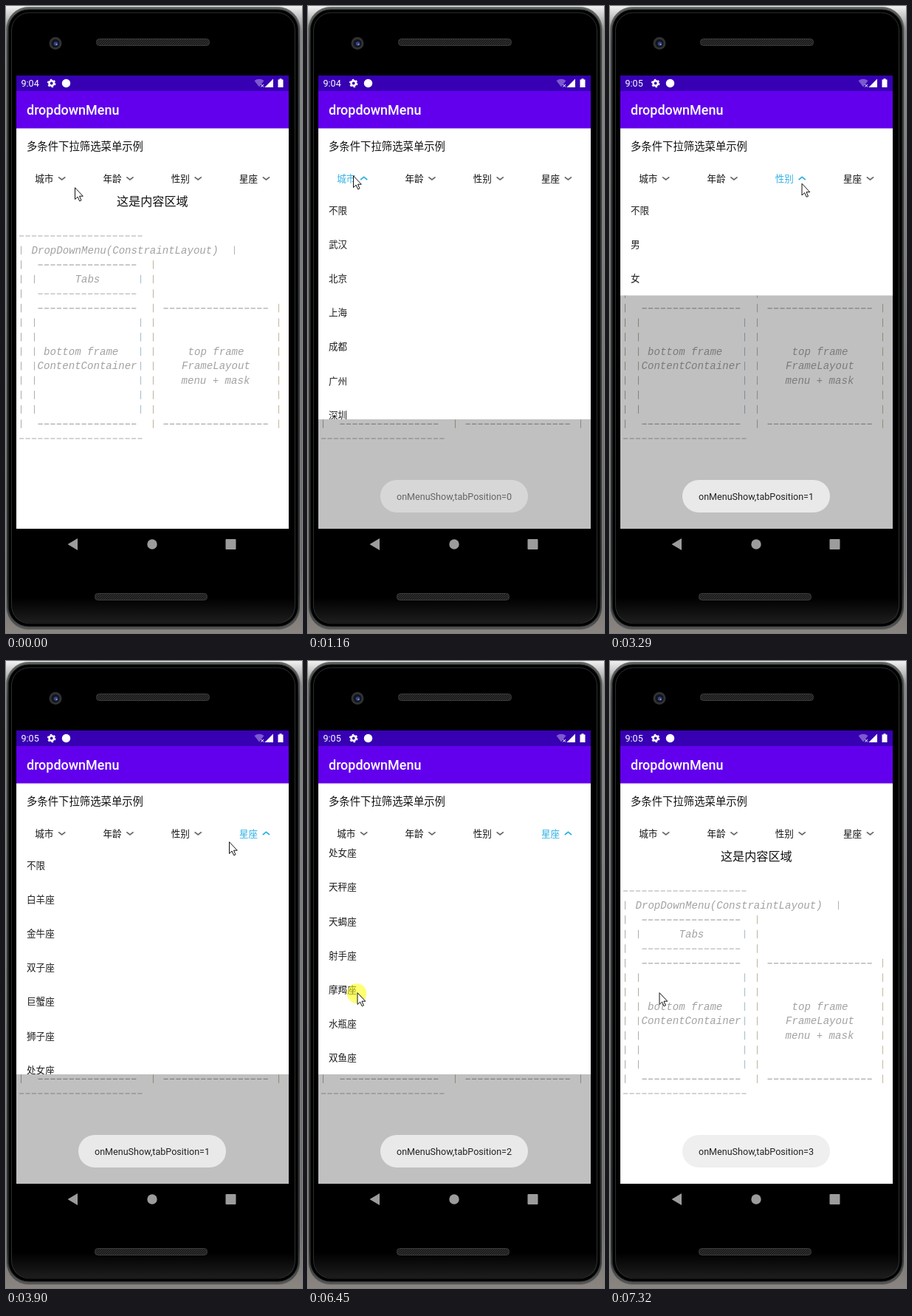
An HTML page that plays this animation: 401x848 px, repeating every 8000 ms.

```html
<!DOCTYPE html>
<html lang="zh-CN">
<head>
<meta charset="utf-8">
<title>dropdownMenu</title>
<style>
html, body { margin: 0; width: 100%; height: 100%; overflow: hidden; background: #777; }
svg { display: block; width: 401px; height: 848px; font-family: Roboto, "Noto Sans CJK SC", "Noto Sans CJK", sans-serif; }
.mono { font: italic 14.07px "Liberation Mono", monospace; fill: #a2a2a2; }
.item { font-size: 12.57px; fill: #1c1c1c; }
</style>
</head>
<body>
<svg viewBox="0 0 401 848" xmlns="http://www.w3.org/2000/svg">
  <defs>
    <linearGradient id="back" x2="0" y2="1">
      <stop offset="0" stop-color="#f2f2f2"/><stop offset=".04" stop-color="#8a8a8a"/>
      <stop offset=".9" stop-color="#6c6c6c"/><stop offset="1" stop-color="#8b8580"/>
    </linearGradient>
    <linearGradient id="rim" x2="0" y2="1">
      <stop offset="0" stop-color="#5c605f"/><stop offset=".06" stop-color="#3a3d3d"/>
      <stop offset=".94" stop-color="#2c2e2e"/><stop offset="1" stop-color="#555"/>
    </linearGradient>
    <linearGradient id="foot" x2="0" y2="1">
      <stop offset="0" stop-color="#000"/><stop offset="1" stop-color="#1d1d1d"/>
    </linearGradient>
    <pattern id="mesh" width="3" height="3" patternUnits="userSpaceOnUse">
      <rect width="3" height="3" fill="#1b1b1b"/><path d="M0 3L3 0" stroke="#3d3d3d" stroke-width=".8"/>
    </pattern>
    <clipPath id="page"><rect x="14" y="253" width="369" height="454"/></clipPath>
    <clipPath id="listClip"><rect id="listBox" x="14" y="253" width="369" height="306"/></clipPath>
  </defs>

  <rect width="401" height="848" fill="url(#back)"/>
  <rect x=".5" y="1.5" width="398" height="842" rx="30" fill="url(#rim)" stroke="#777b7a"/>
  <rect x="3.5" y="5" width="392" height="834" rx="27" fill="#000" stroke="#161717"/>
  <path d="M8 800H392V815Q390 834 368 834H32Q10 834 8 815Z" fill="url(#foot)"/>
  <rect x="7.5" y="9" width="384" height="826" rx="24" fill="none" stroke="#2d2f2f"/>
  <rect x="122.500" y="44.500" width="153" height="9" rx="4" fill="url(#mesh)" stroke="#3b3b3b"/>
  <rect x="120.500" y="794.500" width="152" height="9" rx="4" fill="url(#mesh)" stroke="#3b3b3b"/>
  <circle cx="67" cy="50.500" r="8.500" fill="#303234"/>
  <circle cx="67" cy="50.500" r="5.500" fill="#12151f"/>
  <circle cx="67.500" cy="51" r="2.800" fill="#34447c"/>
  <circle cx="68.500" cy="52" r="1" fill="#93a5dc"/>

  <rect x="14" y="94" width="369" height="613" fill="#fff"/>
  <rect x="14" y="94" width="369" height="21" fill="#3700b3"/>
  <rect x="14" y="115" width="369" height="50.500" fill="#6200ee"/>
  <text id="clock" x="20.500" y="109" font-size="12.57" fill="#fff"></text>
  <g fill="none" stroke="#fff">
    <circle cx="61.700" cy="104.500" r="3.200" stroke-width="2.600"/>
    <circle cx="61.700" cy="104.500" r="5" stroke-width="1.600" stroke-dasharray="2.600 2.636"/>
  </g>
  <circle cx="81.500" cy="104.500" r="5.700" fill="#fff"/>
  <path d="M336.500 101Q343 96.500 349.500 101L343 109.500Z" fill="#fff" opacity=".35"/>
  <path d="M345.500 106l3.600 3.600m0-3.600l-3.600 3.600" stroke="#fff"/>
  <path d="M362 98.500V110H350.500Z" fill="#fff"/>
  <path d="M368.500 99.500h2v-1.300h3v1.300h2V110h-7Z" fill="#fff"/>
  <text x="28" y="147" font-size="17.96" font-weight="500" fill="#fff">dropdownMenu</text>
  <text x="28" y="195.300" font-size="14.37" fill="#111">多条件下拉筛选菜单示例</text>
  <g id="tabs"></g>

  <text x="198.300" y="270" font-size="16.1" text-anchor="middle" fill="#111">这是内容区域</text>
  <g id="chart"></g>
  <g clip-path="url(#page)">
    <rect id="mask" x="14" y="253" width="369" height="454"/>
    <g id="menu">
      <rect id="panel" x="14" y="253" width="369" height="306" fill="#fff"/>
      <g clip-path="url(#listClip)"><g id="lists"></g></g>
    </g>
  </g>
  <g id="toast">
    <rect x="98" y="641" width="200" height="44" rx="22" fill="#eee" opacity=".9"/>
    <g id="message" font-size="12.57" fill="#222"></g>
  </g>

  <g fill="#9c9c9c">
    <path d="M83.500 728L97 720V736Z"/><circle cx="198" cy="728" r="6.700"/>
    <rect x="297.500" y="721" width="14" height="14" rx="1"/>
  </g>
  <g id="cursor">
    <circle id="press" cx="-.5" cy="1.500" r="13.300" fill="#ff0" opacity=".55"/>
    <path d="M.5 .7V16.500L4.100 13.100L6.700 18.800L9 17.800L6.500 12.200H11.300Z" fill="#fff" stroke="#111"/>
  </g>
</svg>
<script>
const LOOP = 8000, ROW = 46.15, TOP = 253;
const $ = id => document.getElementById(id);
const add = (parent, tag, attrs, text = '') => {
  const el = document.createElementNS('http://www.w3.org/2000/svg', tag);
  for (const k in attrs) el.setAttribute(k, attrs[k]);
  el.textContent = text;
  return parent.appendChild(el);
};
const set = (id, k, v) => $(id).setAttribute(k, v);
const ramp = (t, a, b) => Math.min(1, Math.max(0, (t - a) / (b - a)));
const ease = p => (1 - Math.cos(Math.PI * p)) / 2;

// Interpolates rows of [time, ...values]
function track(keys, t, curve = p => p) {
  const i = keys.findIndex(k => k[0] > t);
  if (i === 0) return keys[0].slice(1);
  if (i < 0) return keys[keys.length - 1].slice(1);
  const a = keys[i - 1], b = keys[i], p = curve(ramp(t, a[0], b[0]));
  return a.slice(1).map((v, n) => v + (b[n + 1] - v) * p);
}

const menus = [
  ['城市', '不限 武汉 北京 上海 成都 广州 深圳'],
  ['年龄', '不限 18岁以下 18-22岁 23-26岁 27-35岁 35岁以上'],
  ['性别', '不限 男 女'],
  ['星座', '不限 白羊座 金牛座 双子座 巨蟹座 狮子座 处女座 天秤座 天蝎座 射手座 摩羯座 水瓶座 双鱼座']
].map(([name, words], i) => {
  const items = words.split(' '), x = 39.3 + i * 92.25;
  const label = add($('tabs'), 'text', { x, y: 238, 'font-size': 12.57 }, name);
  const arrow = add($('tabs'), 'path', { fill: 'none', 'stroke-width': 1.7 });
  const list = add($('lists'), 'g', {});
  items.forEach((s, n) => add(list, 'text', { class: 'item', x: 28, y: 280.8 + n * ROW }, s));
  return { x: x + 36.4, label, arrow, list, height: Math.min(306, items.length * ROW) };
});

// Layout diagram
const rowY = r => 311 + r * 19.57;
const dashes = (r, x, n) => add($('chart'), 'path', {
  d: `M${x} ${rowY(r)}h${n * 8.44}`, stroke: '#aaa', 'stroke-width': 1.1, 'stroke-dasharray': '6.2 2.24'
});
const bars = (x, rows, color) => rows.forEach(r =>
  add($('chart'), 'path', { d: `M${x} ${rowY(r) - 6}v11.500`, stroke: color, 'stroke-width': 1.1 }));
const span = (a, b) => Array.from({ length: b - a + 1 }, (_, i) => a + i);
[0, 14].forEach(r => dashes(r, 18, 20));
[2, 4, 5, 13].forEach(r => dashes(r, 43.5, 16));
[5, 13].forEach(r => dashes(r, 213.5, 17));
bars(20.5, span(1, 13), '#b4afaa');
bars(309.5, [1], '#b4b4b4');
bars(38.5, [3, ...span(6, 12)], '#b4afaa');
bars(182.5, [3, ...span(6, 12)], '#a3bfd0');
bars(199.5, span(2, 13), '#c4b5a2');
bars(369.5, span(5, 13), '#c9b8a2');
[[1, 34.5, 'DropDownMenu(ConstraintLayout)'], [3, 93.5, 'Tabs'], [8, 51, 'bottom frame'],
 [9, 42.5, 'ContentContainer'], [8, 246.5, 'top frame'], [9, 238, 'FrameLayout'], [10, 237.5, 'menu + mask']]
  .forEach(([r, x, s]) => add($('chart'), 'text', { class: 'mono', x, y: rowY(r) + 4 }, s));

// Toast text with one stacked digit per tab
const lead = add($('message'), 'text', { x: 120, y: 668 }, 'onMenuShow,tabPosition=');
const digitX = 120 + lead.getComputedTextLength();
const digits = [0, 1, 2, 3].map(n => add($('message'), 'text', { x: digitX, y: 668 }, n));
const toastAt = [930, 2830, 4850, 6890], FADE = 400;

const pointer = [
  [30, 93, 245], [80, 91, 245], [230, 91, 245], [590, 61, 229], [1600, 61, 229], [1820, 140, 241],
  [2350, 140, 241], [2640, 228, 243], [3200, 228, 243], [3460, 318, 233], [3650, 318, 233],
  [3880, 302, 244], [3910, 302, 244], [3980, 230, 291], [4030, 230, 291], [4250, 221, 471],
  [4400, 221, 471], [4500, 218, 441], [4600, 209, 386], [4690, 195, 342], [4800, 193, 340],
  [5100, 193, 340], [5200, 150, 399], [5400, 62, 440], [5540, 33, 446], [5740, 66.5, 448]
];
const presses = [[770, 870], [1830, 1930], [2750, 2850], [3490, 3600], [4250, 4690], [6450, 6910]];
const scrolls = [[4400, 0], [4500, 30], [4600, 85], [4700, 150], [4800, 220], [4900, 268], [5000, 293.5]];
const opens = [870, 1930, 2850, 3600], CLOSE = 6910, SLIDE = 250;

function draw(t) {
  const shown = Math.max(0, opens.filter(o => t >= o).length - 1);
  const active = t >= opens[0] && t < CLOSE ? shown : -1;
  const reveal = ease(ramp(t, opens[0], opens[0] + SLIDE)) * (1 - ease(ramp(t, CLOSE, CLOSE + SLIDE)));
  const h = menus[shown].height;
  menus.forEach((m, i) => {
    const on = i === active, y = on ? 235 : 231.3, tip = on ? -3.6 : 3.6;
    m.label.setAttribute('fill', on ? '#2fb0e4' : '#111');
    m.arrow.setAttribute('stroke', on ? '#2fb0e4' : '#666');
    m.arrow.setAttribute('d', `M${m.x - 4.6} ${y}l4.600 ${tip}l4.600 ${-tip}`);
    m.list.setAttribute('display', i === shown ? 'inline' : 'none');
  });
  menus[3].list.setAttribute('transform', `translate(0 ${-track(scrolls, t)[0]})`);
  set('panel', 'height', h);
  set('listBox', 'height', h);
  set('menu', 'transform', `translate(0 ${-(1 - reveal) * h})`);
  set('menu', 'display', reveal > 0 ? 'inline' : 'none');
  set('mask', 'opacity', .247 * reveal);

  const fades = toastAt.map(a => ramp(t, a, a + FADE));
  set('toast', 'opacity', fades[0]);
  digits.forEach((d, i) => d.setAttribute('opacity', (i ? fades[i] : 1) * (1 - (fades[i + 1] || 0))));

  const [x, y] = track(pointer, t);
  set('cursor', 'transform', `translate(${x} ${y})`);
  set('press', 'display', presses.some(([a, b]) => t >= a && t < b) ? 'inline' : 'none');
  $('clock').textContent = t < 1800 ? '9:04' : '9:05';
}

const start = performance.now();
function tick() {
  draw((performance.now() - start) % LOOP);
  requestAnimationFrame(tick);
}
tick();
</script>
</body>
</html>
```
